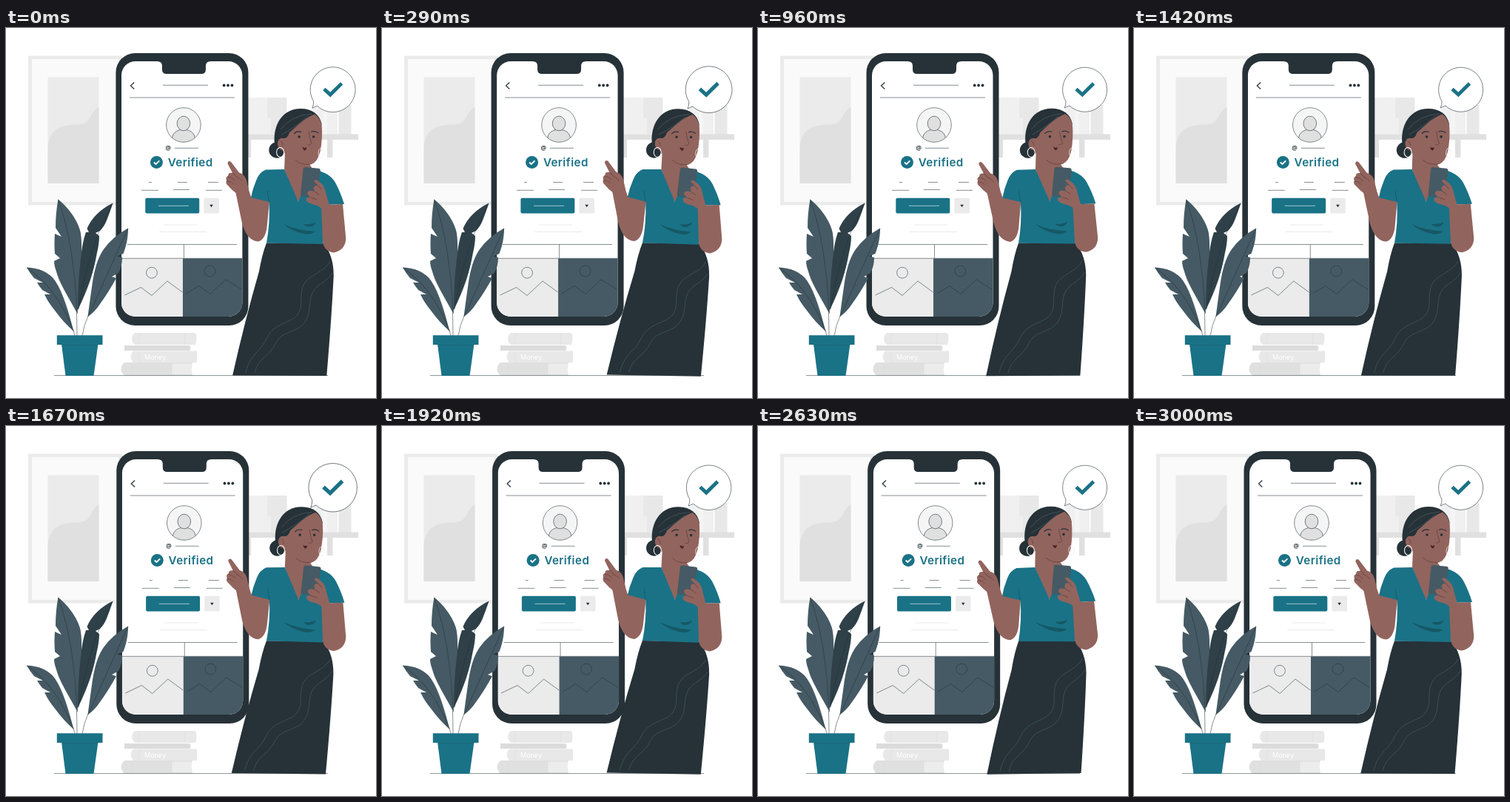
Recreate the animation shown at these times as an HTML page. Size 500 by 500 pixels, loop 3.04 s.

```html
<!DOCTYPE html>
<html lang="en">
<head>
<meta charset="utf-8">
<title>Verified account</title>
<style>
html, body { margin: 0; width: 100%; height: 100%; overflow: hidden; background: #fff; }
svg { display: block; width: 100vw; height: 100vh; }
text { font-family: Inter, "Open Sans", sans-serif; }
.teal { fill: #1a7286; }
.ink { fill: #263238; }
.slate { fill: #455a64; }
.skin { fill: #92645e; }
.line { fill: none; stroke: #263238; stroke-width: .55; }
.soft { fill: none; stroke: #dcdcdc; stroke-width: .6; }
.fold { fill: none; stroke: #5f3c3a; stroke-width: .7; stroke-linecap: round; }
</style>
</head>
<body>
<svg viewBox="0 0 500 500">
  <defs>
    <clipPath id="screen"><rect x="156" y="45" width="163.500" height="345" rx="19"/></clipPath>
    <clipPath id="avatar"><circle cx="240" cy="131" r="23.300"/></clipPath>
  </defs>

  <!-- wall picture -->
  <path fill="#ebebeb" d="M30 37.500H157V239.500H30z"/>
  <path fill="#fafafa" d="M35 42H152V235H35z"/>
  <path fill="#ebebeb" d="M56.500 66.500h69v143.500h-69z"/>
  <path fill="#e0e0e0" d="M125.500 106.500C117 111 116 119 111 125C104 133 92 129 80 132C66 134 58 146 56.500 160V210h69z"/>

  <!-- shelf -->
  <path fill="#f0f0f0" d="M322 94h31v28h-31zM322 122h36v21.500h-36zM415 104h33v40h-33z"/>
  <path fill="#e8e8e8" d="M353 94h26.500v28H379V143.500H358V122H353zM449.500 104h17v40h-17z"/>
  <path fill="#f5f5f5" d="M428 104h6v40h-6z"/>
  <path fill="#e0e0e0" d="M318 143.500H476V151H441.500v24h-7.500v-24H331v24h-7v-24h-6z"/>

  <!-- book stack -->
  <path fill="#e8e8e8" d="M174 412h82q3 8 0 16h-82q-8-8 0-16z"/>
  <path fill="#dcdcdc" d="M160 429h88q3 3.500 0 7h-88z"/>
  <path fill="#e8e8e8" d="M172 436.500h86v15.500h-86q-7-8 0-15.500z"/>
  <path fill="#e0e0e0" d="M160 452h92q-3 8.500 0 17.500h-92q-9-8 0-17.500z"/>
  <path fill="#ececec" d="M224 453.500h27q-2 7 0 14.500h-27z"/>
  <path class="soft" d="M180 412v16M242 412v16M170 452v17M224 452v17M180 437v15"/>
  <text x="187" y="447.500" font-size="9" fill="#fff">Money</text>

  <path class="line" d="M65 469.600H435"/>

  <g id="phone">
    <rect class="ink" x="148.500" y="34" width="179" height="368" rx="26"/>
    <g clip-path="url(#screen)">
      <path fill="#fff" d="M156 45h164v345h-164z"/>
      <path class="ink" d="M204 44v1q7 0 7 6v5q0 6 6 6h47q6 0 6-6v-5q0-6 7-6v-1z"/>
      <path fill="#ebebeb" d="M156 311.500h83V390H156z"/>
      <path class="slate" d="M239 311.500h81V390h-81z"/>
      <path class="line" d="M156 311.300H320"/>
      <g class="line">
        <circle cx="197" cy="330.700" r="7.400"/>
        <path d="M160.500 361L182.500 350.500 197 361.500 218 342 238.500 357"/>
        <circle cx="275.500" cy="328.500" r="7.400"/>
        <path d="M243.500 359L261 348.500 276 359.500 297 340 318 353"/>
      </g>
    </g>
    <path class="line" style="stroke-width:1.200" d="M173.300 73.500L168.500 78l4.800 4.500"/>
    <g class="ink">
      <circle cx="294.700" cy="77.500" r="1.900"/>
      <circle cx="300.100" cy="77.500" r="1.900"/>
      <circle cx="305.500" cy="77.500" r="1.900"/>
    </g>
    <path class="line" d="M212 77.300H273M167 94H309M228 162.300H260M164 292.500H312M240.500 292.500V311"/>
    <g clip-path="url(#avatar)" stroke="#263238" stroke-width=".6">
      <path fill="#f5f5f5" d="M216 107h48v48h-48z"/>
      <path fill="#e0e0e0" d="M224.500 156V150C225 142 230 139 236 137.500H244C250 139 255 142 255.500 150V156z"/>
      <ellipse cx="240" cy="129" rx="8.800" ry="9.800" fill="#e0e0e0"/>
    </g>
    <circle class="line" cx="240" cy="131" r="23.300"/>
    <text class="ink" x="215.500" y="164" font-size="7.500" font-weight="600">@</text>
    <circle class="teal" cx="203.500" cy="181.500" r="8.500"/>
    <path fill="none" stroke="#fff" stroke-width="1.800" d="M200 181.500l2.600 2.500 4.800-4.700"/>
    <text class="teal" x="218.800" y="187.200" font-size="15.200" font-weight="600" letter-spacing=".4">Verified</text>
    <path class="line" d="M193 208.500h4M232 208.500h13M273 208.500h14M183 219.300h23M226 218.500h22M270 219.300h22"/>
    <rect class="teal" x="188.300" y="229.800" width="73" height="20.700" rx="2"/>
    <path stroke="#fff" stroke-width=".6" d="M206 240.300h41"/>
    <rect fill="#ebebeb" x="267.300" y="229.800" width="20.700" height="20.700" rx="2"/>
    <path class="ink" d="M275.300 238.800h4.600l-2.300 3.500z"/>
    <path class="soft" d="M213 266h45M207 275.500h64"/>
  </g>

  <!-- plant -->
  <path class="line" d="M95.500 385L96 416M111 389Q105 402 103 416M91 408L93 416"/>
  <path class="slate" d="M70.500 231.500C82 241 95 256 100 273C103 284 102.500 305 101 325Q99 358 96.500 386C87 368 72 345 68 329Q65 321 65 315L73 311 66 305Q65 290 66 278L75 282 67 270Q67 250 70.500 231.500z"/>
  <path fill="#2f4048" d="M144.500 236.500Q140 250 136 260Q133 268 127 274L121 277 126 281Q126 292 122.500 306C119 327 112 351 97 381Q97 345 101 312Q103 290 108 276L112 276 109.500 271Q119 249 144.500 236.500z"/>
  <path class="slate" d="M165 270.500C165 285 162 296 158.500 305L150 308.500 157 310Q157 322 152 331L143 336 149 338Q138 358 127 373Q119 385 110.500 390Q113 371 116 350C119 327 124 310 132 299Q144 282 165 270.500z"/>
  <path class="slate" d="M28 323.500C44 324 58 330 66 341C78 359 85 385 91.500 410Q77 397 67 383Q57 371 52 360L60 360 49 354Q45 349 42 344L50 344 38 338Q32 331 28 323.500z"/>
  <path class="line" d="M70.500 232Q92 290 96 386M144 237Q113 290 98 380M165 271Q140 325 111 390M28 324Q68 350 91 409"/>
  <path class="teal" d="M75 427h49.500l-6 43H80.500z"/>
  <path fill="#155c6c" d="M75 427.500h49.500l-.2 1H75.200z"/>
  <path class="teal" d="M68.800 415.300h61.700V428H68.800z"/>

  <g id="woman">
    <!-- pointing arm -->
    <path class="skin" d="M309 216L319 264Q326 288 341 288.500Q350 286 352.500 270L356 233 331 228 326 213z"/>
    <path class="skin" d="M299.300 183Q300 178.500 304 181L315 195.500Q323 198 325 206L328 219 312 224Q305 219 300 213Q296 210 298 206Q296 202 300 200Q300 195 306 196z"/>
    <path class="fold" d="M306 196Q309 197 311 201M300 201Q306 202 309 206M298.500 207Q304 207 307 211M311 201Q316 203 319 207"/>

    <!-- skirt -->
    <path class="ink" d="M352 290.500H429Q443 308 442.800 335Q440 392 433.500 470L306.300 469.500Q323 395 342 329Q346 306 352 290.500z"/>
    <g fill="none" stroke="#455a64" stroke-width=".7">
      <path d="M438 315C428 334 404 332 400 354C397 370 403 382 388 393C372 402 361 402 352 420C344 438 330 440 324 466"/>
      <path d="M441 331C432 346 416 346 412 364C409 379 412 390 400 402C389 412 373 410 365 425C357 444 341 445 336 466"/>
    </g>

    <!-- neck and blouse -->
    <path class="skin" d="M377 165L376 191 388 225 396 236 408 220 414 190 407 180z"/>
    <path class="teal" d="M376 191L351 191.500Q342 195 338 206Q333 218 331 229L355.500 235Q357 264 352 290.500L428 292 429 239 457 238Q452 222 445 209C440 200 431 195 421 192.500L412 190 395 235z"/>
    <path fill="#155866" d="M375 265Q391 273 418 275Q412 280 402 278Q387 275 375 265zM402 265Q412 266 419 262Q416 269 409 268.500Q404 268 402 265z"/>
    <path fill="none" stroke="#155866" stroke-width=".8" d="M355.500 235L353 220M429 239L428 252"/>

    <!-- head -->
    <circle class="ink" cx="366" cy="165" r="10.800"/>
    <path class="ink" d="M363 157C360 132 373 109 398 109C414 109 424 117 426.500 130L415 145 384 162 372 166z"/>
    <path class="skin" d="M375 149Q380 150 383 141C392 134 402 122 417 116.500Q424 121 426.500 131Q428 149 424.500 167Q421 181 413 184Q401 188 389 180L381 173Q377 170 373 165Q366 163 367 154Q369 148 375 149z"/>
    <path fill="none" stroke="#53666f" stroke-width=".6" d="M371 137Q385 118 413 116M372 144Q390 135 408 119"/>
    <g class="ink">
      <circle cx="396" cy="147" r="1.800"/>
      <circle cx="415.500" cy="147" r="1.800"/>
    </g>
    <path fill="none" stroke="#263238" stroke-width="1.100" d="M389 143Q393 138.500 399 140.500M412 140.500Q417 138 422 142"/>
    <path class="fold" d="M409 140Q410 149 413 156Q411 159 408 158M371 153Q374 154 374 159M391 178.500Q399 186 411 184"/>
    <path fill="#4c2428" d="M400.500 160.500Q403 163 406 161Q406 165 403.500 165.500Q401 164.500 400.500 160.500z"/>
    <ellipse cx="370.500" cy="168" rx="5" ry="6.500" fill="none" stroke="#fff"/>
    <ellipse cx="425.500" cy="169" rx="3.500" ry="6.500" fill="none" stroke="#f2eeee" stroke-width=".8"/>

    <!-- hand-held device and arm -->
    <path class="skin" d="M429 239L455 238 459.300 284Q459 300 443 303.500Q430 302 428 289L426 243z"/>
    <path class="slate" d="M404 188L422 189.800Q425 190 424.700 193L420.500 227Q420 230 417 229.500L400 227.500Q397.500 227 398 224L401.500 190Q402 188 404 188z"/>
    <path class="skin" d="M416 207Q417 204 421 206L427 211Q431 215 432.500 224L437 240 428 245Q421 239 413 238Q405 235 405.500 231Q407 228 412 229Q405 224 408 221Q411 219 417 221Q414 215 418 213L422 213z"/>
    <path class="fold" d="M412 229L420 232M417 221L423 225M422 213L426 218"/>
  </g>

  <g id="bubble">
    <path fill="#fff" stroke="#263238" stroke-width=".6" d="M416 98.800A30 30 0 1 1 421 105Q417.500 106 414.300 108Q416.300 103 416 98.800z"/>
    <path fill="none" stroke="#1a7286" stroke-width="4.800" d="M430 82.500L438.300 90 453.500 75"/>
  </g>
</svg>
<script>
const LOOP = 3040;
const $ = id => document.getElementById(id);

// Piecewise linear keyframes: [percent, value] pairs.
function track(keys, period, time) {
  const p = time % period / period * 100;
  const i = keys.findIndex(k => k[0] > p);
  const [p0, v0] = keys[i - 1], [p1, v1] = keys[i];
  return v0 + (v1 - v0) * (p - p0) / (p1 - p0);
}

const shake = [[0, 0], [10, -1], [20, 2], [30, -4], [40, 4], [50, -4],
               [60, 4], [70, -4], [80, 2], [90, -1], [100, 0]];
const sway = [[0, 0], [25, 1], [75, -1], [100, 0]];
const beat = [[0, 1], [10, 1.1], [30, 1], [40, 1], [50, 1.1], [60, 1], [100, 1]];

function draw(now) {
  const t = 20 + now % LOOP * 2980 / 3000;
  $('phone').setAttribute('transform', `translate(${track(shake, 3000, t)})`);
  $('woman').setAttribute('transform', `rotate(${track(sway, 1500, t)} 378 289.5)`);
  $('bubble').setAttribute('transform',
    `translate(441.5 83) scale(${track(beat, 1500, t)}) translate(-441.5 -83)`);
  requestAnimationFrame(draw);
}
draw(performance.now());
</script>
</body>
</html>
```
